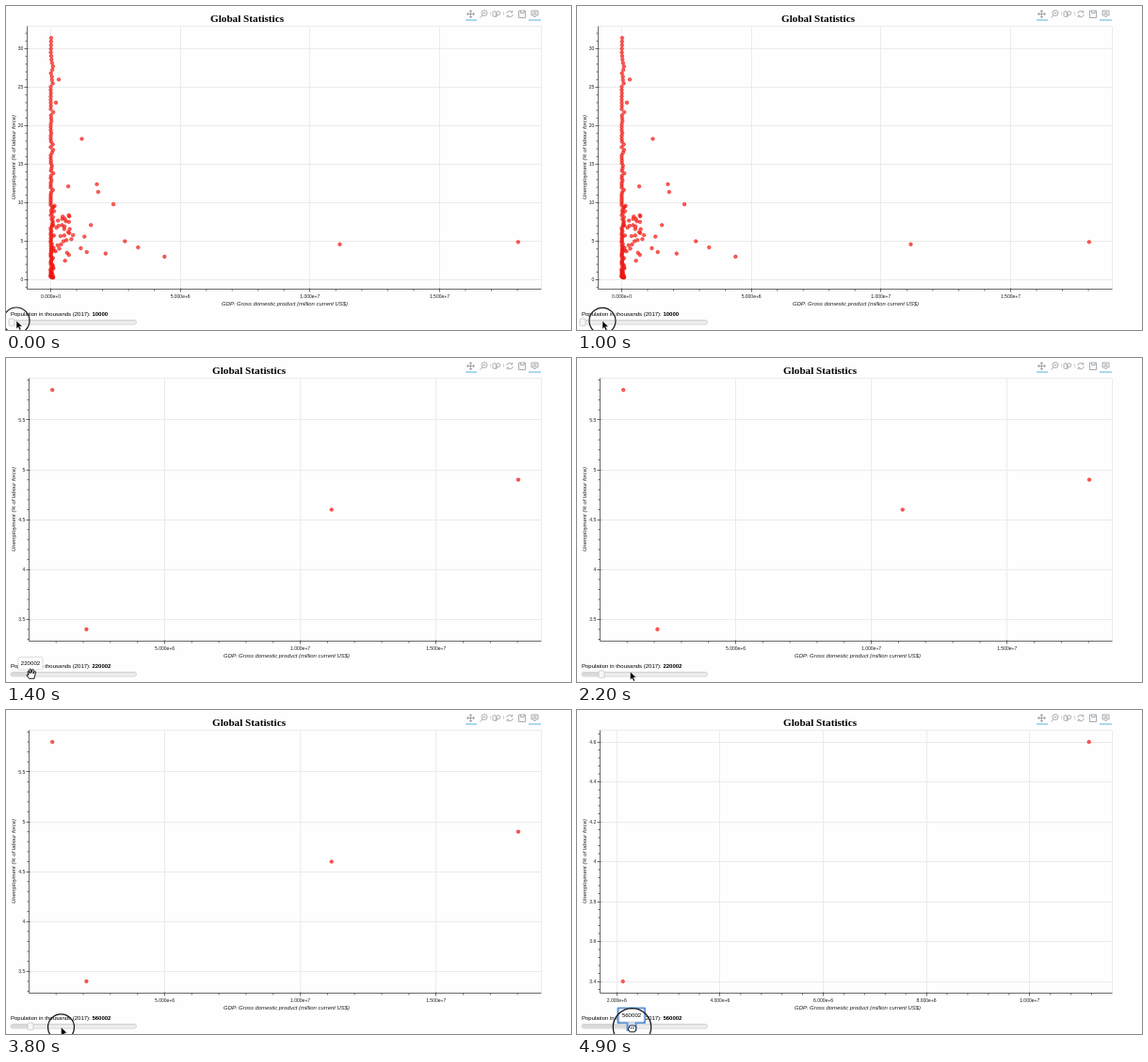
An HTML page that plays this animation: 600x345 px, repeating every 5000 ms.

```html
<!DOCTYPE html>
<html lang="en">
<head>
<meta charset="utf-8">
<title>Global Statistics</title>
<style>
  html, body { margin: 0; width: 100%; height: 100%; overflow: hidden; background: #fefefe; }
  svg { display: block; width: 600px; height: 345px; font-family: "Liberation Sans", Arial, sans-serif; }
  .title { font: bold 11.2px "Liberation Serif", Times, serif; }
  .label { font-size: 5.91px; font-style: italic; fill: #1c1c1c; }
  .num { font-size: 5px; fill: #1c1c1c; }
  .grid { stroke: #ebebeb; fill: none; }
  .axis { stroke: #444; stroke-width: .8; fill: none; }
  .dot { fill: #fb2018; fill-opacity: .72; stroke: #e81410; stroke-opacity: .75; stroke-width: .7; }
  .icon { stroke: #92979c; stroke-width: .8; fill: none; }
  .hand { fill: #fff; stroke: #000; stroke-width: .9; stroke-linejoin: round; }
</style>
</head>
<body>
<svg viewBox="0 0 600 345">
  <defs>
    <linearGradient id="trough" x2="0" y2="1">
      <stop stop-color="#e4e4e4"/><stop offset="1" stop-color="#f6f6f6"/>
    </linearGradient>
  </defs>
  <g id="charts"></g>

  <g class="icon">
    <path d="M489.5 8.5h8M493.5 4.5v8M491 7l-1.500 1.500 1.500 1.500M496 7l1.500 1.500-1.500 1.500M492 6l1.500-1.500 1.500 1.500M492 11l1.500 1.500 1.500-1.500"/>
    <circle cx="508" cy="7.500" r="3"/><path d="M506 9.800l-2.500 2.700M506.500 7.500h3"/>
    <path d="M514.500 6.500v4M528.500 6.500v4" stroke-dasharray="1"/>
    <rect x="517" y="5.500" width="3.400" height="6" rx="1.700"/><circle cx="522.700" cy="7.700" r="2"/><path d="M521.500 9.500l-1 2.500"/>
    <path d="M531.800 8a3 3 0 0 1 5.400-1.500M538.200 9a3 3 0 0 1-5.400 1.500M537.800 4.800v2h-2M532.200 12.200v-2h2"/>
    <path d="M544.500 5h7v7.500h-7zM546.500 5v2.500h3.500V5"/>
    <path d="M558 5h7v5h-2.500l-1 2-1-2H558zM559.500 6.800h4M559.500 8.500h4"/>
    <path d="M488 15h12M555 15h13" stroke="#5ab4e0" stroke-width="1.200"/>
  </g>

  <text x="5" y="330.400" font-size="6">Population in thousands (2017): <tspan id="value" font-weight="bold"></tspan></text>
  <rect x="5" y="334.600" width="133.500" height="4.400" rx="2.200" fill="url(#trough)" stroke="#c8c8c8" stroke-width=".8"/>
  <rect id="filled" x="5.400" y="335" height="3.600" rx="1.800" fill="#d9d9d9"/>
  <g id="handle">
    <rect x="-3" y="333" width="6" height="7.600" rx="1.400" fill="#f7f7f7" stroke="#c4c4c4" stroke-width=".8"/>
    <g id="tip">
      <path id="focus" d="M-14.500 317.500h28.500v15.500h-9.500v8h-9v-8h-10z" fill="#cfe0f5" stroke="#5c95dc" stroke-width="2" stroke-linejoin="round"/>
      <rect x="-13" y="318.500" width="26" height="13.500" rx="1.300" fill="#fff" stroke="#d5d5d5" stroke-width=".8"/>
      <text id="tipText" y="327.200" font-size="6.100" text-anchor="middle"></text>
    </g>
  </g>

  <g id="pointer">
    <path id="arrow" d="M0 0v8.800l2-1.800 1.500 3.200 1.600-.7-1.500-3.200h2.800z" stroke="#fff" stroke-width=".5"/>
    <path id="open" class="hand" d="M-2.500 6L-5 2.500q.3-1.500 2 0l-1-4q.8-1.500 1.700.2l.5 2-.3-4.500q1-1.200 1.800 0l.3 4 .8-3.600q1.200-1 1.600.3l-.3 4 1.200-2.300q1.300-.6 1.300.6L3 6z"/>
    <path id="closed" class="hand" d="M-2.500 5l-1.700-3q-.3-1.500 1.200-1.300v-2q1-1.200 1.800-.2 1-1.200 2 0 1-1 1.800.2 1.500-.6 1.600.8v2.500L3 5zM-1 0v1.500M1 0v1.500"/>
    <circle id="ring" fill="none" stroke="#111" stroke-width="1.200"/>
  </g>
</svg>
<script>
const $ = id => document.getElementById(id);
const show = (id, on) => $(id).setAttribute('display', on ? 'inline' : 'none');
const set = (id, name, v) => $(id).setAttribute(name, v);
const half = v => Math.floor(v + .01) + .5;

let seed = 7;
const rnd = () => (seed = seed * 16807 % 2147483647) / 2147483647;

// countries as [GDP in 10^12 US$, unemployment in %], most populous first
const data = [[2.117, 3.4], [11.15, 4.6], [.86, 5.8], [18.03, 4.9],
  [1.2, 18.3], [1.78, 12.4], [1.83, 11.4], [2.42, 9.8], [1.55, 7.1], [2.86, 5],
  [3.37, 4.2], [4.39, 3], [1.39, 3.6], [1.16, 4.1], [1.3, 5.6], [.31, 26], [.2, 23]];
// mid-sized economies, then the column of small ones
for (let i = 0; i < 36; i++)
  data.push([.1 + .7 * rnd() ** 1.6, 1 + 5 * (rnd() + rnd()) + 3 * rnd() ** 3]);
for (let i = 0; i < 125; i++)
  data.push([.1 * rnd() ** 3, .3 + 31.1 * (i / 124) ** 1.9]);

// x0, y0: pixel of zero; kx, ky: pixels per unit; sx, sy: label steps
const charts = [
  { left: 22.5, x0: 47.5, kx: 27.53, sx: 5, y0: 291.5, ky: 8.2, sy: 5, count: data.length },
  { left: 24.5, x0: 24.4, kx: 28.82, sx: 5, y0: 650, ky: 106.2, sy: .5, count: 4 },
  { left: 24.5, x0: -67.3, kx: 54.8, sx: 2, y0: 1011.5, ky: 212.5, sy: .2, count: 2 }
];

function draw(c, i) {
  const L = c.left, mid = L + 273;
  let grid = `M${L} 21.5H568.5V301.5`, axis = `M${L} 21.5V301.5H568.5`, nums = '';
  // every fifth tick is a labelled one
  for (let k = 0, x; (x = c.x0 + k * c.sx / 5 * c.kx) < 568; k++) {
    if (x < L + 1) continue;
    if (k % 5) { axis += `M${x} 301.5v2`; continue; }
    grid += `M${half(x)} 21.5V301.5`;
    axis += `M${half(x)} 300.5v4`;
    nums += `<text x="${x}" y="310.6" text-anchor="middle">${(k / 5 * c.sx * 1e6).toExponential(3)}</text>`;
  }
  for (let k = -1, y; (y = c.y0 - k * c.sy / 5 * c.ky) > 22; k++) {
    if (y > 301) continue;
    if (k % 5) { axis += `M${L} ${y}h-2`; continue; }
    grid += `M${L} ${half(y)}H568.5`;
    axis += `M${L + 1} ${half(y)}h-4`;
    nums += `<text x="${L - 4.3}" y="${y + 1.8}" text-anchor="end">${+(k / 5 * c.sy).toFixed(1)}</text>`;
  }
  const dots = data.slice(0, c.count)
    .map(([g, u]) => `<circle cx="${c.x0 + g * c.kx}" cy="${c.y0 - u * c.ky}" r="1.8"/>`).join('');
  return `<g id="chart${i}"><path class="grid" d="${grid}"/><path class="axis" d="${axis}"/>
    <g class="num">${nums}</g><g class="dot">${dots}</g>
    <text class="title" x="${mid - 39.5}" y="16.5" text-anchor="middle">Global Statistics</text>
    <text class="label" x="${mid + .5}" y="319" text-anchor="middle">GDP: Gross domestic product (million current US$)</text>
    <text class="label" transform="translate(10 161) rotate(-90)" text-anchor="middle">Unemployment (% of labour force)</text></g>`;
}
$('charts').innerHTML = charts.map(draw).join('');

// pointer moves: start, end, distance
const moves = [[100, 600, 16, .3], [1400, 1700, 17, 1.2], [1800, 2200, 12.5, -2.5], [3200, 3600, 2, 3.8]];

function pointerAt(t) {
  let x = 11, y = 335;
  for (const [a, b, dx, dy] of moves) {
    const k = Math.min(1, Math.max(0, (t - a) / (b - a)));
    x += dx * k;
    y += dy * k;
  }
  return [x, y];
}

function frame(now) {
  const t = Math.floor(now % 5000 / 100) * 100;
  const within = (a, b) => t >= a && t < b;
  const stage = t < 1200 ? 0 : t < 3900 ? 1 : 2;
  const value = t < 1100 ? 10000 : t < 3800 ? 220002 : 560002;
  const knob = [6, 26, 58][stage];

  charts.forEach((c, i) => show('chart' + i, i === stage));
  $('value').textContent = $('tipText').textContent = value;
  set('filled', 'width', Math.max(0, knob - 6));
  set('handle', 'transform', `translate(${knob} 0)`);
  show('tip', within(1400, 1500) || t >= 4700);
  show('focus', t >= 4800);

  const open = within(1300, 1500) || within(4400, 4700), closed = t >= 4700;
  set('pointer', 'transform', `translate(${pointerAt(t)})`);
  show('open', open);
  show('closed', closed);
  show('arrow', !open && !closed);
  show('ring', t < 100 || within(700, 1300) || within(2900, 3000) || within(3700, 4100) || t >= 4800);
  set('ring', 'r', t >= 4900 ? 20.2 : 14);
  requestAnimationFrame(frame);
}
frame(0);
</script>
</body>
</html>
```
